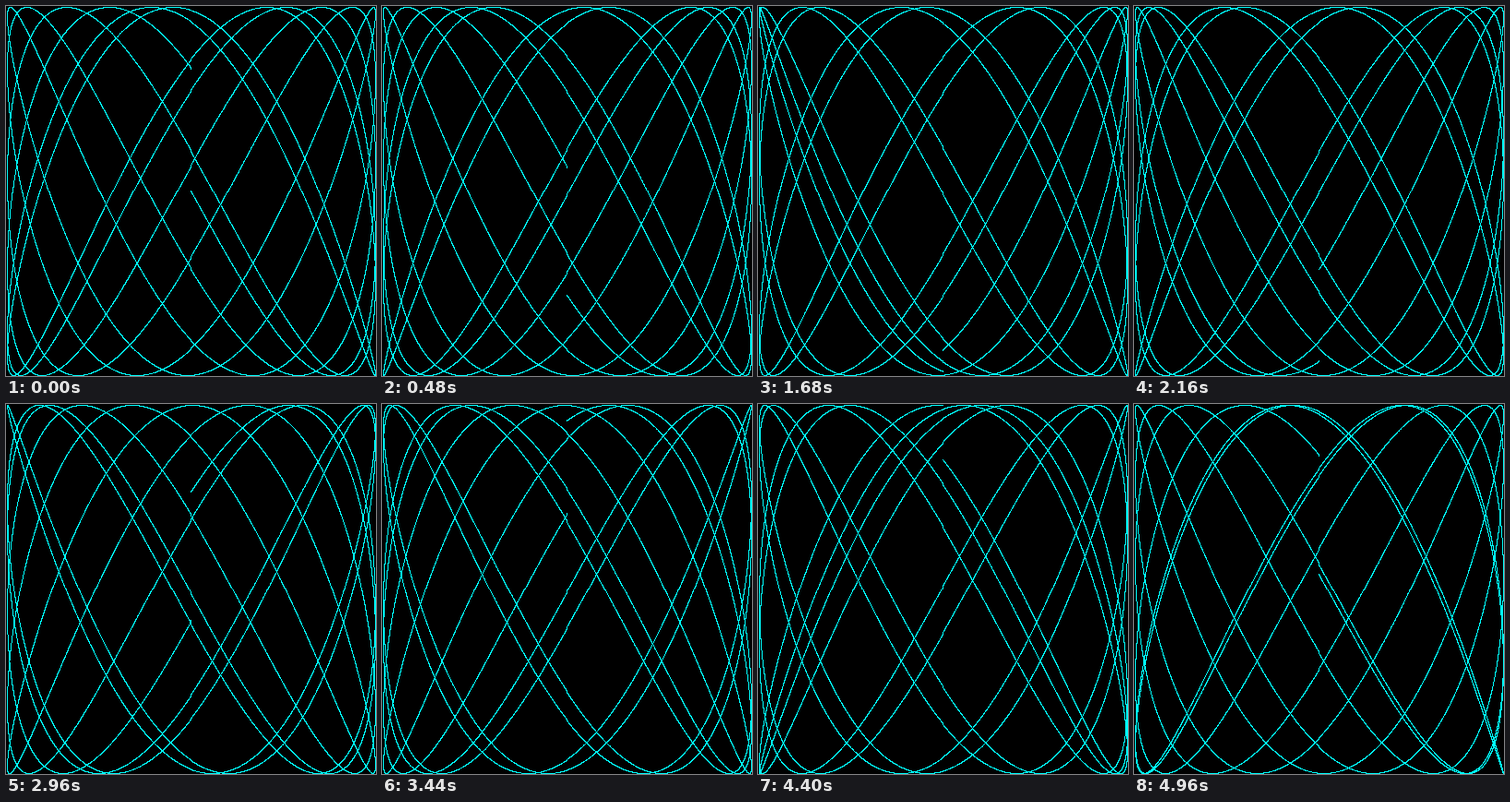
These frames come from a looping animation (401 by 401 pixels, 5040 ms). An HTML page with a canvas:

```html
<!DOCTYPE html>
<html lang="en">
<head>
<meta charset="utf-8">
<title>Lissajous</title>
<style>
  html, body { margin: 0; width: 100%; height: 100%; overflow: hidden; background: #000; }
  canvas { display: block; image-rendering: pixelated; }
</style>
</head>
<body>
<canvas id="stage" width="401" height="401"></canvas>
<script>
const RADIUS = 200, SIZE = 2 * RADIUS + 1;
const CYCLES = 6, STEP = 0.001, FREQ = 1.8139808639388588;
const FRAME_MS = 80, FRAMES = 63, PHASE_STEP = 0.1;
const BLACK = 0xff000000, CYAN = 0xffffff00; // ABGR

const ctx = document.getElementById('stage').getContext('2d');
const image = ctx.createImageData(SIZE, SIZE);
const pixels = new Uint32Array(image.data.buffer);

// Truncation toward zero gives the small kink at the centre lines.
const toPixel = v => RADIUS + Math.trunc(v * RADIUS + 0.5);

function draw(phase) {
  pixels.fill(BLACK);
  for (let t = 0; t < CYCLES * 2 * Math.PI; t += STEP) {
    const x = toPixel(Math.sin(t));
    const y = toPixel(Math.sin(t * FREQ + phase));
    pixels[y * SIZE + x] = CYAN;
  }
  ctx.putImageData(image, 0, 0);
}

let shown = -1;
function tick() {
  const frame = Math.floor(performance.now() / FRAME_MS) % FRAMES;
  if (frame !== shown) draw((shown = frame) * PHASE_STEP);
  requestAnimationFrame(tick);
}
tick();
</script>
</body>
</html>
```
